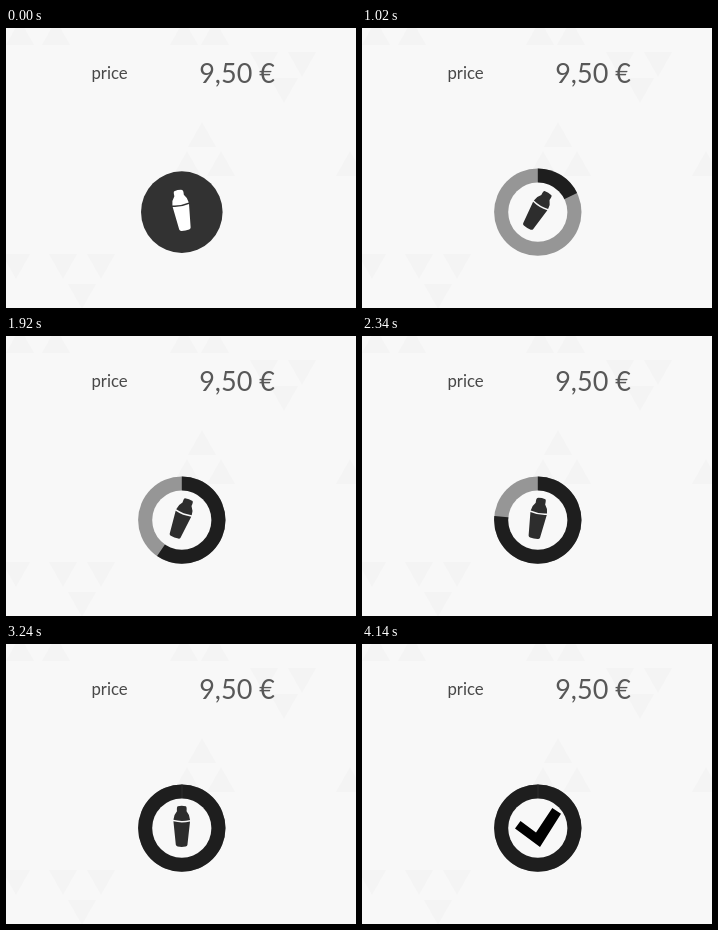
An HTML page with a canvas that plays this animation: 350 px wide and 280 px high, repeating every 5.46 s.

```html
<!DOCTYPE html>
<html lang="en">
<head>
<meta charset="utf-8">
<title>Price</title>
<style>
  html, body { margin: 0; width: 100%; height: 100%; overflow: hidden; background: #f8f8f8; }
  canvas { display: block; width: 350px; height: 280px; }
</style>
</head>
<body>
<canvas id="stage" width="350" height="280"></canvas>
<script>
const ctx = document.getElementById('stage').getContext('2d');
const LOOP = 5460, STEP = 60;
const CX = 175.8, CY = 184.1;
const PAPER = '#f8f8f8';

const clamp = v => Math.min(1, Math.max(0, v));
const progress = (t, from, to) => clamp((t - from) / (to - from));
const swing = p => 0.5 - Math.cos(p * Math.PI) / 2;

// Piecewise linear interpolation through [time, value] points.
function track(points, t) {
  if (t <= points[0][0]) return points[0][1];
  for (let i = 1; i < points.length; i++) {
    const [t0, v0] = points[i - 1], [t1, v1] = points[i];
    if (t <= t1) return v0 + (v1 - v0) * (t - t0) / (t1 - t0);
  }
  return points[points.length - 1][1];
}

const sweep = [[640, 0], [1020, 64], [1920, 214.5], [2340, 275.5], [2860, 360]];

function polygon(points, color) {
  ctx.fillStyle = color;
  ctx.beginPath();
  points.forEach(([x, y]) => ctx.lineTo(x, y));
  ctx.closePath();
  ctx.fill();
}

function disc(radius, color) {
  ctx.fillStyle = color;
  ctx.beginPath();
  ctx.arc(CX, CY, radius, 0, Math.PI * 2);
  ctx.fill();
}

function withAlpha(alpha, draw) {
  if (alpha <= 0) return;
  ctx.save();
  ctx.globalAlpha = alpha;
  draw();
  ctx.restore();
}

function text(value, x, y, size, color) {
  ctx.font = size + 'px Lato, sans-serif';
  ctx.fillStyle = color;
  ctx.fillText(value, x, y);
}

function background() {
  ctx.fillStyle = PAPER;
  ctx.fillRect(0, 0, 350, 280);
  const triangle = (x, base, height) =>
    polygon([[x - 14, base], [x + 14, base], [x, base - height]], '#f4f4f4');
  [[14, 17], [50, 17], [178, 17], [209, 17], [196, 119], [181, 148], [215, 148], [344, 148]]
    .forEach(([x, y]) => triangle(x, y, 25));
  [[258, 24], [296, 24], [278, 50], [10, 226], [57, 226], [95, 226], [76, 256]]
    .forEach(([x, y]) => triangle(x, y, -25));
}

function shaker(angle, color) {
  ctx.save();
  ctx.translate(175.7, 182.3);
  ctx.rotate(angle * Math.PI / 180);
  ctx.fillStyle = color;
  // Lid
  ctx.beginPath();
  ctx.moveTo(-4, -20);
  ctx.quadraticCurveTo(0, -21, 4, -20);
  ctx.quadraticCurveTo(5.2, -19.5, 4.8, -15);
  ctx.quadraticCurveTo(8, -11.5, 8.3, -6.4);
  ctx.quadraticCurveTo(0, -4.4, -8.3, -6.4);
  ctx.quadraticCurveTo(-8, -11.5, -4.8, -15);
  ctx.quadraticCurveTo(-5.2, -19.5, -4, -20);
  ctx.fill();
  // Cup
  ctx.beginPath();
  ctx.moveTo(-8.3, -4.9);
  ctx.quadraticCurveTo(0, -2.9, 8.3, -4.9);
  ctx.lineTo(5.8, 18.6);
  ctx.quadraticCurveTo(5.5, 19.9, 4, 20.2);
  ctx.quadraticCurveTo(0, 21, -4, 20.2);
  ctx.quadraticCurveTo(-5.5, 19.9, -5.8, 18.6);
  ctx.closePath();
  ctx.fill();
  ctx.restore();
}

// Steady rocking between two tilts that comes to rest leaning right.
function tilt(t) {
  const phase = Math.max(0, Math.min(t, 3420) - 780) / 240 % 2;
  return -10 + 41 * (1 - Math.abs(1 - phase));
}

function ring(degrees) {
  const top = -Math.PI / 2;
  disc(43.7, '#969696');
  ctx.fillStyle = '#1e1e1e';
  ctx.beginPath();
  ctx.moveTo(CX, CY);
  ctx.arc(CX, CY, 43.7, top, top + degrees * Math.PI / 180);
  ctx.closePath();
  ctx.fill();
  if (degrees >= 360) {
    ctx.fillStyle = '#2c2c2c';
    ctx.fillRect(175.5, CY - 43.5, 1, 15);
  }
  disc(29.6, PAPER);
}

function check() {
  polygon([[153, 184.5], [158.5, 177], [174, 188.5], [190.3, 164], [199, 169.7], [178, 203]], '#000');
}

function render(t) {
  background();
  text('price', 85.4, 51.3, 16.8, '#484848');
  text('9,50 €', 193.2, 54.5, 27, '#585858');

  const opened = progress(t, 480, 660);
  withAlpha(opened, () => ring(track(sweep, t)));
  withAlpha(1 - opened, () => {
    disc(40.8, '#323232');
    shaker(-10, '#fff');
  });
  withAlpha(opened * (1 - swing(progress(t, 3340, 3740))), () => shaker(tilt(t), '#2d2d2d'));
  withAlpha(swing(progress(t, 3740, 4140)), check);
}

function tick() {
  const t = performance.now() % LOOP;
  render(Math.floor(t / STEP) * STEP);
  requestAnimationFrame(tick);
}
tick();
</script>
</body>
</html>
```
